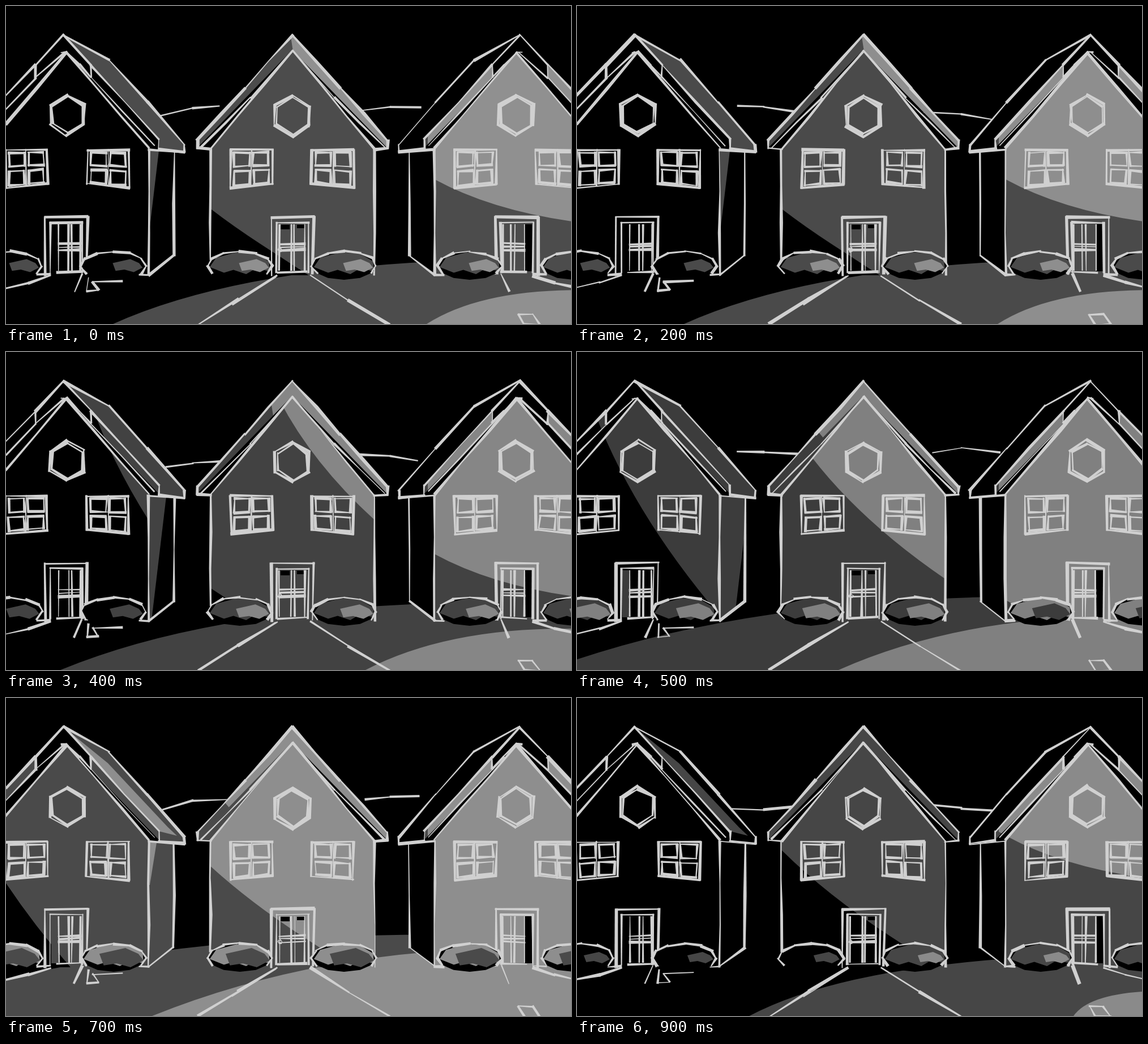
Write an HTML page with a canvas that moves like this. It is 998 px wide and 561 px high and loops after 1000 ms.

```html
<!DOCTYPE html>
<html lang="en">
<head>
<meta charset="utf-8">
<title>Street at night</title>
<style>
html, body { margin: 0; width: 100%; height: 100%; overflow: hidden; background: #000; }
canvas { display: block; width: 998px; height: 561px; }
</style>
</head>
<body>
<canvas id="stage" width="998" height="561"></canvas>
<script>
const ctx = document.getElementById('stage').getContext('2d');
const INK = '#d0d0d0', BLACK = '#000';

// Ten poses: where the bright pool of light begins, and the mid grey.
const REACH = [743, 743, 743, 690, 635, 462, 360, 258, 543, 877];
const GREY = [76, 75, 74, 70, 66, 60, 67, 74, 78, 70];

let seed, reach, mid, light;
let flip = false; // the street is symmetric: shapes can be mirrored

function rnd() {
  seed = (seed + 0x6D2B79F5) | 0;
  let t = Math.imul(seed ^ (seed >>> 15), 1 | seed);
  t = (t + Math.imul(t ^ (t >>> 7), 61 | t)) ^ t;
  return ((t ^ (t >>> 14)) >>> 0) / 4294967296;
}
const jit = a => (rnd() * 2 - 1) * a;

function trace(p) {
  ctx.beginPath();
  for (let i = 0; i < p.length; i += 2) ctx.lineTo(flip ? 1009 - p[i] : p[i], p[i + 1]);
  ctx.closePath();
}
function fill(p, color) {
  trace(p);
  ctx.fillStyle = color;
  ctx.fill();
}
function surface(p, base, paint) {
  ctx.save();
  fill(p, base);
  trace(p);
  ctx.clip();
  paint();
  ctx.restore();
}
const box = (x, y, r, b) => [x, y, r, y, r, b, x, b];

function ring(x, y, rx, ry, from, step, n, wobble = 0) {
  const p = [];
  for (let i = 0; i < n; i++) {
    const a = from + i * step;
    p.push(x + rx * Math.cos(a) + jit(wobble), y + ry * Math.sin(a) + jit(wobble));
  }
  return p;
}

// Fills everything right of a curved shadow edge, up to the far height.
function beyond([ax, ay], [mx, my], [bx, by], color, far) {
  const cx = 2 * mx - (ax + bx) / 2, cy = 2 * my - (ay + by) / 2;
  const ex = bx + (bx - cx) / 2, ey = by + (by - cy) / 2;
  ctx.beginPath();
  ctx.moveTo(ax, ay);
  ctx.quadraticCurveTo(cx, cy, bx, by);
  ctx.lineTo(ex, ey);
  ctx.lineTo(1400, ey);
  ctx.lineTo(1400, far);
  ctx.lineTo(ax, far);
  ctx.fillStyle = color;
  ctx.fill();
}

// A brush line of uneven width with slightly wandering points.
function ink(p, w = 5, closed = false) {
  const q = closed ? p.concat(p[0], p[1]) : p;
  for (let i = 0; i + 3 < q.length; i += 2) {
    const dx = q[i + 2] - q[i], dy = q[i + 3] - q[i + 1];
    const len = Math.hypot(dx, dy) || 1;
    const nx = -dy / len, ny = dx / len;
    const n = Math.max(1, Math.round(len / 75));
    const over = Math.min(1.5, w / 3) / len;
    const one = [], two = [];
    for (let j = 0; j <= n; j++) {
      const t = j === 0 ? -over : j === n ? 1 + over : j / n;
      const o = jit(1), h = w * (0.15 + rnd() * 0.52);
      const x = q[i] + dx * t + nx * o, y = q[i + 1] + dy * t + ny * o;
      one.push(x + nx * h, y + ny * h);
      two.unshift(x - nx * h, y - ny * h);
    }
    fill(one.concat(two), INK);
  }
}

function mirrored(part) {
  for (flip of [false, true]) part();
  flip = false;
}

function ground() {
  surface(box(0, 415, 998, 561), BLACK, () => {
    const a = 0.86 * reach - 450;
    beyond([a, 561], [a / 2 + 340, 435 + 0.07 * reach], [760, 400 + 0.068 * reach], mid, 700);
    beyond([reach, 561], [reach / 2 + 485, 436 + 0.108 * reach], [1010, 412 + 0.12 * reach], light, 700);
  });
}

function hill() {
  const y = 188 + jit(16), end = 183 + jit(10);
  ink([269 + jit(16), y, 330, (y + end) / 2 - 2 + jit(5), 386 + jit(12), end], 4);
}

// Shadow sliding across the outer house fronts.
function sideShade() {
  if (flip) {
    const y = 0.47 * (743 - reach);
    beyond([745, 299 + y], [860, 349 + y], [1000, 380 + y], light, -50);
  } else {
    const x = 0.72 * (reach - 462);
    beyond([25 + x, 90], [120 + x, 285], [265 + x, 480], mid, -50);
  }
}

function sideHouse() {
  fill([102, 51, 182, 95, 250, 170, 315, 245, 315, 257, 270, 252, 270, 235], flip || reach > 800 ? BLACK : mid);
  if (!flip && (reach > 800 || reach < 300))
    fill([105, 54, 150, 104, 270, 235, 302, 243, 286, 228, 180, 115], reach < 300 ? light : mid);
  fill([102, 51, 150, 104, 150, 126, 107, 82], BLACK);

  surface([252, 253, 297, 257, 296, 440, 252, 474], BLACK, () => {
    if (flip) return;
    const x = 283 + (635 - reach) * 0.12;
    fill([200, 255, x, 255, x - 26, 474, 200, 474], mid);
    if (reach < 300) fill([200, 255, 266, 255, 254, 330, 200, 330], light);
  });

  const front = [-50, 263, 107, 80, 252, 250, 252, 475, -50, 475];
  const eaves = [[150, 104, 270, 235, 270, 250, 150, 126], [52, 104, -40, 200, -40, 222, 52, 127]];
  for (const p of [front, ...eaves]) surface(p, flip ? mid : BLACK, sideShade);

  ink([102, 51, 182, 95, 250, 170, 315, 245, 315, 257, 270, 252], 4.5);
  ink([102, 51, 52, 104, 0, 158], 5.5);
  ink([52, 104, 52, 127], 4);
  ink([102, 82, 52, 127, 0, 181], 3.5);
  ink([102, 51, 150, 104, 270, 235, 270, 252], 4);
  ink([98, 82, 107, 81, 130, 104, 150, 125, 150, 104], 4);
  ink([150, 126, 262, 246], 2.5);
  ink([107, 82, 0, 208], 5);
  ink([107, 82, 252, 250], 5);
  ink([315, 258, 252, 253, 252, 474], 4.5);
  ink([297, 257, 296, 440, 252, 474, 236, 474], 4.5);
}

// Shadow sliding across the middle house front.
function midShade(at, color) {
  const x = 0.77 * (at - 462);
  beyond([350 + x, 85], [480 + x, 260], [680 + x, 420], color, -50);
}

function middleHouse() {
  const slit = [505, 78, 338, 250, 362, 252];
  surface([506, 50, 338, 237, 338, 251, 506, 78, 674, 251, 674, 237], mid, () => {
    const cut = 403 + (reach - 462) * 0.37;
    if (reach < 800) fill([cut - 12, 0, cut + 6, 120, cut + 130, 270, 998, 270, 998, 0], light);
  });
  fill(slit, reach < 600 ? mid : BLACK);
  surface([506, 80, 362, 252, 362, 475, 651, 475, 651, 252], BLACK, () => {
    midShade(reach - 580, mid);
    midShade(reach, light);
  });
  mirrored(() => {
    const x = flip ? -3 : 0;
    ink([506 + x, 51, 422 + x, 145, 338 + x, 237, 338 + x, 251, 362 + x, 253], 5);
    ink([506 + x, 79, 432 + x, 162, 344 + x, 249], 3.5);
    ink([506 + x, 79, 362 + x, 252], 4);
    ink([361 + x, 253, 361 + x, flip ? 474 : 447], 4.5);
  });
}

function attic(x, y) {
  for (const r of [35, 31])
    ink(ring(x, y, r, r * 1.03, Math.PI / 6, Math.PI / 3, 6, 1.5), 4.5, true);
}

// u, v run from 0 to 1 over a window that is taller at its left edge.
function casement(x) {
  const quad = (a, b, c, d) => [[a, b], [c, b], [c, d], [a, d]]
    .flatMap(([u, v]) => [x + u * 74 + jit(1), 254 + v * (67 - 7 * u)]);
  ink(quad(0, 0, 1, 1), 4.5, true);
  for (const u of [0.08, 0.54])
    for (const v of [0.07, 0.57]) ink(quad(u, v, u + 0.37, v + 0.37), 4.5, true);
  ink([x + 36, 253, x + 36, 318], 2.5);
}

function door(x, l, r) {
  const m = (l + r) / 2;
  ink([x, 475, x, 373, x + 75, 372, x + 73, 472], 5);
  ink([x + 9, 470, x + 9, 382, x + 66, 382, x + 65, 470], 4);
  for (const [px, w] of [[l, 3], [m - 2, 4], [m + 4, 3], [r, 4]]) ink([px, 386, px, 466], w);
  for (const [y, w] of [[420, 4], [425, 3], [431, 5]]) ink([l, y, r, y - 1], w);
  ink([l - 3, 470, r + 3, 468], 4);
}

function bush(x, cap, patch) {
  const at = p => p.map((v, i) => i % 2 ? 458 + v * 25 : x + (flip ? -v : v) * 56);
  const grow = Math.min(1.5, 1.6 - reach / 1100);
  fill(ring(x, 458, 57, 25, 0, Math.PI / 6, 12), BLACK);
  fill(at([-.95, .1, -.75, -.55, -.1, -.95, .5, -.85, .92, -.3, .95, .4, .5, .2, .2, .6, -.2, .3, -.5, .5]), cap);
  fill(at([-.1, -.2, .5, -.5, .8, -.2, .92, .15, .62, .5, .3, .3, 0, .4]
    .map((v, i) => i % 2 ? v * grow : .85 + (v - .85) * grow)), patch);
  ink(ring(x, 458, 57, 25, Math.PI * 0.82, Math.PI * 0.17, 9, 1), 4.5);
}

function sideDetails() {
  attic(108, 192);
  casementPair(-1, 143);
  fill(box(80, 385, 92, 468), flip || reach > 600 ? BLACK : mid);
  door(69, 93, 132);
  const near = flip ? 500 : 300;
  const cap = reach < near ? light : flip || reach < 500 ? mid : BLACK;
  const patch = reach < near ? mid : flip || reach < 500 ? light : mid;
  for (const x of [7, 190]) bush(x, cap, patch);
  ink([78, 476, 40, 488, 0, 497], 5);
  ink([55, 474, 78, 473], 4);
  ink([134, 473, 121, 503], 5);
}

// The right-hand window of a pair slants the other way.
function casementPair(left, right) {
  const was = flip;
  casement(was ? 1009 - left - 74 - (1009 - 2 * left - 74) : left);
  flip = !was;
  casement(1009 - right - 74);
  flip = was;
}

function middleDetails() {
  attic(506, 194);
  casementPair(397, 540);
  fill(box(485, 386, 501, 394), BLACK);
  fill(box(514, 386, 528, 392), BLACK);
  door(469, 483, 528);
  ink(ring(484, 430, 3.5, 3.5, 0, 1, 6), 2, true);
  bush(413, reach < 300 ? light : reach > 800 ? BLACK : mid, reach > 800 || reach < 300 ? mid : light);
  bush(597, reach < 300 ? light : mid, reach < 300 ? mid : light);
  ink([478, 476, 410, 517, 340, 561], 5);
  ink([476, 478, 400, 526], 3);
  ink([538, 476, 605, 519, 677, 561], 5);
}

function draw(pose) {
  seed = pose * 7919 + 17;
  reach = REACH[pose];
  const g = GREY[pose];
  mid = `rgb(${g},${g},${g})`;
  light = `rgb(${g + 68},${g + 68},${g + 68})`;
  ctx.fillStyle = BLACK;
  ctx.fillRect(0, 0, 998, 561);
  ground();
  mirrored(hill);
  mirrored(sideHouse);
  middleHouse();
  mirrored(sideDetails);
  middleDetails();
  ink([145, 480, 143, 503, 163, 501, 153, 487, 205, 485], 4);
  ink([905, 544, 930, 544, 943, 562, 916, 562], 3.5, true);
}

let shown = -1;
function tick() {
  const pose = Math.floor(performance.now() % 1000 / 100);
  if (pose !== shown) draw(shown = pose);
  requestAnimationFrame(tick);
}
tick();
</script>
</body>
</html>
```
